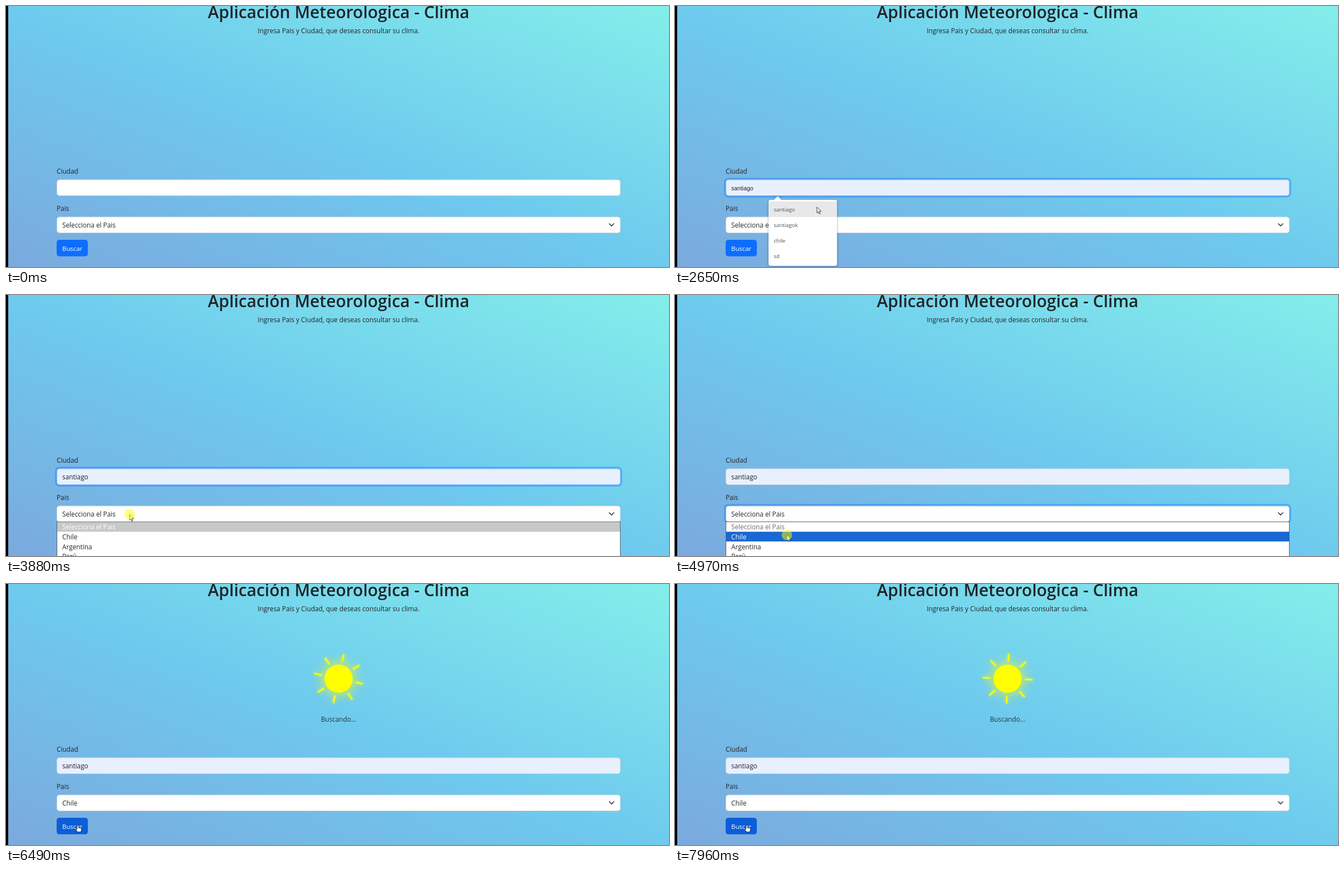
An HTML page for the animation above (8000 ms loop, 1191 px wide and 470 px high).

```html
<!DOCTYPE html>
<html lang="es">
<head>
<meta charset="utf-8">
<title>Aplicación Meteorologica</title>
<style>
  html, body { margin: 0; width: 100%; height: 100%; overflow: hidden; }
  svg {
    display: block; width: 1191px; height: 470px;
    background: linear-gradient(to top right, #7ba9dd, #6ec9ee 48%, #84eeea);
    font: 11.8px 'Open Sans', 'Noto Sans', sans-serif; fill: #212529;
  }
  .title { font-size: 30px; font-weight: 600; }
  .center { text-anchor: middle; }
  .field { fill: #fff; stroke: #ced4da; }
  .ring rect { fill: none; }
  .ring .halo { stroke: #0d6efd; stroke-opacity: .35; stroke-width: 3.2; }
  .ring .edge { stroke: #86b7fe; }
  .preview { font: 10.5px 'Liberation Sans', Arial, sans-serif; }
  #popup { filter: drop-shadow(0 1px 2px #0005); }
  #popup text { font-size: 9.6px; fill: #4d5156; }
  #disc { filter: drop-shadow(0 0 12px #ff0); }
  #rays { stroke: #ff0; stroke-width: 2.8; filter: drop-shadow(0 0 3px #ff0c); }
  #cursor path { fill: #fff; stroke: #222; stroke-width: .9; stroke-linejoin: round; }
  #cursor #beam { fill: none; stroke-width: 1; }
</style>
</head>
<body>
<svg viewBox="0 0 1191 470">
  <rect width="4" height="470" fill="#000"/>
  <text class="title center" x="597.5" y="22">Aplicación Meteorologica - Clima</text>
  <text class="center" x="597.5" y="49">Ingresa Pais y Ciudad, que deseas consultar su clima.</text>

  <g id="sun">
    <g transform="translate(597.5 170.5)" fill="#ff0">
      <g id="rays"></g>
      <circle id="disc" r="25.3"/>
    </g>
    <text class="center" x="597.5" y="247.7" opacity=".9">Buscando...</text>
  </g>

  <text x="91" y="302">Ciudad</text>
  <g id="cityRing" class="ring">
    <rect class="halo" x="89.7" y="310.9" width="1015.6" height="32.6" rx="6"/>
  </g>
  <rect id="city" class="field" x="91.5" y="312.9" width="1012" height="28.6" rx="4.5"/>
  <text id="preview" class="preview" x="101" y="331.6">santiago</text>
  <text id="cityText" x="101" y="332">santiago</text>

  <text x="91" y="369">Pais</text>
  <g id="countryRing" class="ring">
    <rect class="halo" x="89.7" y="377.9" width="1015.6" height="32.6" rx="6"/>
  </g>
  <rect id="country" class="field" x="91.5" y="379.9" width="1012" height="28.6" rx="4.5"/>
  <text id="countryText" x="101" y="398.7"></text>
  <path d="M1083.8 392l4.1 4.1l4.1-4.1" fill="none" stroke="#343a40" stroke-width="1.6" stroke-linecap="round" stroke-linejoin="round"/>

  <rect id="button" x="91" y="421" width="56" height="29.8" rx="4.7"/>
  <text x="101" y="440.7" style="font-size:11.4px;fill:#fff">Buscar</text>

  <g id="popup">
    <path d="M177 350l7.5-7.5l7.5 7.5z" fill="#fff"/>
    <rect x="168" y="349" width="123" height="119" rx="4" fill="#fff"/>
    <rect id="popupHover" x="168" y="352" width="123" height="28" fill="#e7e8e9"/>
  </g>

  <g id="list">
    <rect x="91.5" y="408.5" width="1012" height="80" fill="#fff" stroke="#59626c"/>
    <rect id="listHover" x="92" width="1011" height="17.5"/>
  </g>

  <g id="cursor">
    <path id="arrow" d="M0 0V10.6L2.4 8.4L4.1 12.3L5.9 11.5L4.2 7.7H7.5Z"/>
    <path id="beam" d="M-2-6H2M0-6V6M-2 6H2"/>
    <path id="hand" d="M-1.2 0.6Q0-1 1.2 .6V5L5.4 5.8Q6.8 6.2 6.6 7.6L5.6 12.4H-.4L-3.6 8.2Q-3.4 6.4-1.2 7.8Z"/>
    <circle id="click" r="9.5" fill="#ff0" opacity=".5"/>
  </g>
</svg>
<script>
const LOOP = 8000, SEARCH_AT = 5990;
const $ = id => document.getElementById(id);
const show = (id, on) => $(id).style.display = on ? '' : 'none';
const clamp = v => Math.min(1, Math.max(0, v));
const ramp = (t, from, to) => clamp((t - from) / (to - from));
const within = (t, from, to) => t >= from && t < to;

function add(parent, tag, attrs, text = '') {
  const el = document.createElementNS('http://www.w3.org/2000/svg', tag);
  for (const key in attrs) el.setAttribute(key, attrs[key]);
  el.textContent = text;
  $(parent).append(el);
  return el;
}

['santiago', 'santiagok', 'chile', 'sd'].forEach((word, i) =>
  add('popup', 'text', { x: 177.5, y: 370 + 28 * i }, word));
const options = ['Selecciona el Pais', 'Chile', 'Argentina', 'Perú'].map((word, i) =>
  add('list', 'text', { x: 101, y: 422.4 + 17.6 * i }, word));
for (let i = 0; i < 8; i++)
  add('rays', 'path', { d: 'M0-31V-45', transform: `rotate(${45 * i})` });

// start, end, x, y, upward bend
const moves = [
  [590, 1160, 560, 307, 27],
  [1400, 1430, 558.5, 309, 0],
  [1470, 1500, 559, 312, 0],
  [1720, 2510, 285, 351, 0],
  [2510, 2650, 255, 362, 0],
  [2880, 2920, 254, 362, 0],
  [3150, 3740, 222, 395, 0],
  [4250, 4710, 201, 432, 0],
  [5340, 5640, 129, 434, 0]
];
const clicks = [[1570, 1770], [2990, 3190], [3810, 4020], [4970, 5190], [5670, 5870]];

function pointer(t) {
  let x = 932, y = 308;
  for (const [from, to, toX, toY, bend] of moves) {
    if (t < from) break;
    const p = ramp(t, from, to), eased = p * p * (3 - 2 * p);
    x += (toX - x) * eased;
    y += (toY - y) * eased - bend * Math.sin(Math.PI * eased);
  }
  return { x, y };
}

function drawRing(id, amount) {
  $(id + 'Ring').style.opacity = amount;
  $(id).style.stroke = amount > .5 ? '#86b7fe' : '';
}

function draw(t) {
  const { x, y } = pointer(t);
  const overButton = x < 147;
  const overCity = within(y, 312, 342);

  show('cursor', t >= 590);
  $('cursor').setAttribute('transform', `translate(${x} ${y})`);
  show('hand', overButton);
  show('beam', overCity);
  show('arrow', !overButton && !overCity);
  show('click', clicks.some(([from, to]) => within(t, from, to)));

  drawRing('city', ramp(t, 1770, 1920) - ramp(t, 3950, 4090));
  drawRing('country', ramp(t, 3950, 4090) - ramp(t, 5870, 6020));
  $('city').style.fill = t >= 2580 ? '#e8f0fe' : '';
  show('preview', within(t, 2580, 2990));
  show('cityText', t >= 2990);
  show('popup', within(t, 1840, 3190));
  show('popupHover', t >= 2580);

  const overChile = y >= 426;
  show('list', within(t, 3880, 5190));
  $('listHover').setAttribute('y', overChile ? 426.3 : 408.8);
  $('listHover').style.fill = overChile ? '#1967d2' : '#c8c8c8';
  options[0].style.fill = overChile ? '#6d6d6d' : '#fff';
  options[1].style.fill = overChile ? '#fff' : '';
  $('countryText').textContent = options[t >= 5190 ? 1 : 0].textContent;

  $('button').style.fill = overButton ? '#0b5ed7' : '#0d6efd';
  show('sun', t >= SEARCH_AT);
  $('rays').setAttribute('transform', `rotate(${(t - SEARCH_AT) * 360 / 15000})`);
}

function tick() {
  draw(performance.now() % LOOP);
  requestAnimationFrame(tick);
}
tick();
</script>
</body>
</html>
```
